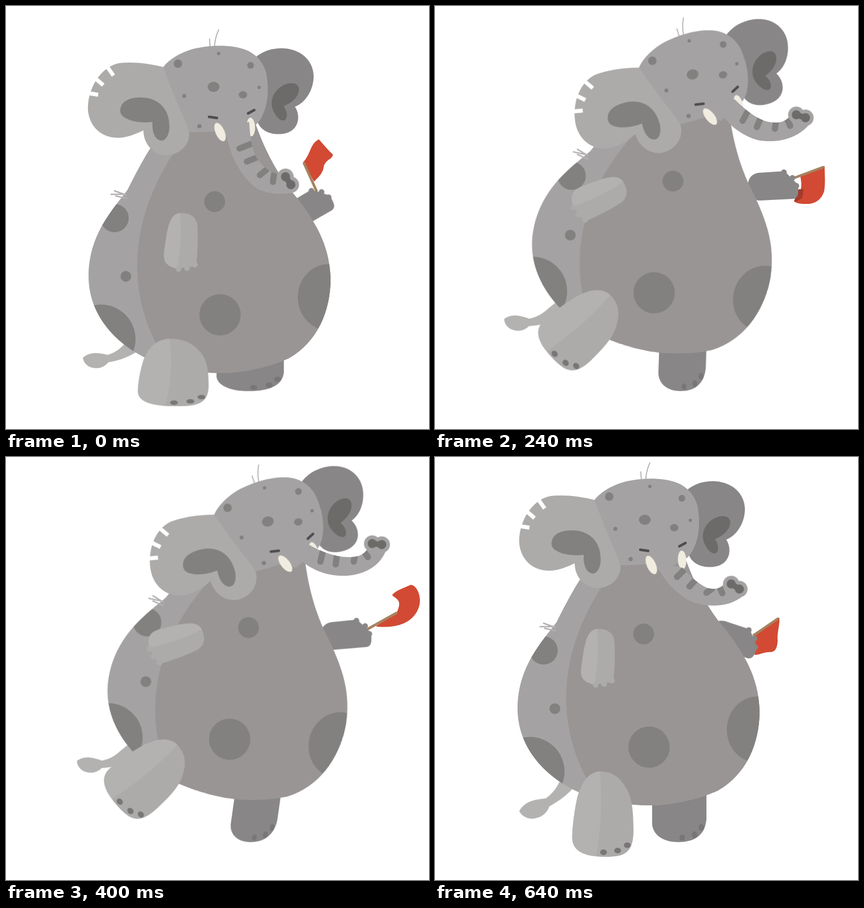
An HTML page without scripts for the animation above (0.72 s loop, 748x748 px).

```html
<!DOCTYPE html>
<html lang="en">
<head>
<meta charset="utf-8">
<title>Marching elephant</title>
<style>
html, body { margin: 0; width: 100%; height: 100%; overflow: hidden; background: #fff; }
svg { display: block; width: 100vw; height: 100vh; }

/* Six key poses a-f; the longer gaps get one in-between each. */
.move { animation: move .72s steps(2, end) infinite; }
.morph { animation: morph .72s steps(2, end) infinite; }
@keyframes move {
  0% { transform: var(--a); animation-timing-function: step-end; }
  11.111% { transform: var(--b); }
  33.333% { transform: var(--c); }
  55.555% { transform: var(--d); }
  77.777% { transform: var(--e); animation-timing-function: step-end; }
  88.888% { transform: var(--f); animation-timing-function: step-end; }
  100% { transform: var(--f); }
}
@keyframes morph {
  0% { d: var(--a); animation-timing-function: step-end; }
  11.111% { d: var(--b); }
  33.333% { d: var(--c); }
  55.555% { d: var(--d); }
  77.777% { d: var(--e); animation-timing-function: step-end; }
  88.888% { d: var(--f); animation-timing-function: step-end; }
  100% { d: var(--f); }
}

.skin { fill: #a4a2a3; }
.far { fill: #888687; }
.near { fill: #acabaa; }
.lit { fill: #b3b2b1; }
.spot { fill: #82817f; }
.toe { fill: #787676; }
.deep { fill: #6c6b69; }
.ivory { fill: #f0ece0; }
.line { fill: none; stroke-linecap: round; }

.body {
  transform-origin: 378px 546px;
  --a: translate(0, 0) rotate(0deg);
  --b: translate(-4px, -15px) rotate(5.2deg);
  --c: translate(9px, -39px) rotate(12.3deg);
  --d: translate(17px, -47px) rotate(12.3deg);
  --e: translate(4px, -6px) matrix(1.0176, -.0318, -.0283, .8864, 0, 0);
  --f: translate(0, -33px) rotate(0deg);
}
.head {
  transform-origin: 367px 143px;
  --a: translate(0, 0) rotate(0deg);
  --b: translate(26px, 1px) rotate(-7deg);
  --c: translate(88.5px, -22px) rotate(-14.3deg);
  --d: translate(96px, -29px) rotate(-14.3deg);
  --e: translate(22.5px, 17px) rotate(-14.3deg);
  --f: translate(4px, -32px) rotate(0deg);
}
.arm {
  transform-origin: 320px 464px;
  --a: translate(0, 0) rotate(0deg) scale(1);
  --b: translate(-28px, -13px) rotate(21deg) scale(1);
  --c: translate(-67px, -95px) rotate(61deg) scale(1);
  --d: translate(-60px, -111px) rotate(68deg) scale(1);
  --e: translate(-83px, -54px) rotate(59deg) scale(.97, .9);
  --f: translate(-21px, -62px) rotate(0deg) scale(1);
}
.leg {
  transform-origin: 323px 696px;
  --a: translate(3px, 3px) rotate(0deg) scale(1.156, .79);
  --b: translate(-6px, -25px) rotate(5deg) scale(1, 1);
  --c: translate(-92px, -65px) rotate(46deg) scale(1, 1);
  --d: translate(-103px, -70px) rotate(48deg) scale(1, 1);
  --e: translate(-70px, -22px) rotate(19deg) scale(1, 1);
  --f: translate(0, 0) rotate(0deg) scale(1, 1);
}
.farleg {
  transform-origin: 437px 681px;
  --a: translate(1px, 0) skewX(0deg) scale(1.24, .8);
  --b: translate(0, 0) skewX(0deg) scale(1, 1);
  --c: translate(3px, 0) skewX(-2deg) scale(.87, 1);
  --d: translate(1px, 0) skewX(-8deg) scale(.85, 1);
  --e: translate(-26px, 1px) skewX(-16deg) scale(1.13, .87);
  --f: translate(0, 0) skewX(0deg) scale(1, 1);
}
.farm {
  transform-origin: 632px 304px;
  --a: translate(-74px, 25px) rotate(-27deg) scale(1, 1);
  --b: translate(-50px, 19px) rotate(-15deg) scale(1, 1);
  --c: translate(0, 0) rotate(0deg) scale(1, 1);
  --d: translate(3px, -5px) rotate(-2deg) scale(1, 1);
  --e: translate(-42px, -20px) rotate(-20deg) scale(1.18, 1);
  --f: translate(-67px, 17px) rotate(22deg) scale(1, 1);
}
.tail {
  transform-origin: 181px 624px;
  --a: translate(0, 0) rotate(0deg) scale(1);
  --b: translate(-2px, -20px) rotate(0deg) scale(1);
  --c: translate(-14px, -64px) rotate(6deg) scale(1);
  --d: translate(-11px, -80px) rotate(6deg) scale(1);
  --e: translate(-13px, -51px) rotate(53deg) scale(1);
  --f: translate(19px, -13px) rotate(-19deg) scale(1.18);
}
.tip {
  --a: translate(499px, 309px) rotate(56deg);
  --b: translate(543px, 297px) rotate(50deg);
  --c: translate(647px, 195px) rotate(18deg);
  --d: translate(656px, 154px) rotate(6deg);
  --e: translate(588px, 154px) rotate(-8deg) scale(1.15, .9);
  --f: translate(531px, 229px) rotate(32deg);
}
.trunk {
  --a: path("M388 215C392 255 410 295 440 320C455 331 478 334 505 331L486 297C470 298 455 285 443 268C434 250 432 235 430 205Z");
  --b: path("M422 215C428 250 448 290 478 310C500 322 530 324 553 318L530 284C515 291 500 283 488 270C474 250 466 235 462 200Z");
  --c: path("M500 180C515 210 545 230 570 237C600 243 640 237 663 208L630 190C625 202 612 207 600 206C575 206 550 185 530 165Z");
  --d: path("M508 165C520 188 550 205 580 209C616 214 658 202 672 165L640 160C636 172 622 178 605 177C580 177 552 165 532 153Z");
  --e: path("M430 215C470 229 500 229 520 228C563 228 600 215 613 163L570 158C568 172 555 182 545 184C520 192 495 195 462 192Z");
  --f: path("M391 185C400 215 425 240 450 254C475 266 520 268 545 245L512 222C508 232 495 236 480 231C462 222 450 209 438 196Z");
}
.rings {
  --a: path("M433 244L413 252M441 269L426 275M460 290L449 299M474 297L472 311");
  --b: path("M470 242L453 250M484 266L468 272M503 286L494 292M518 287L518 302");
  --c: path("M552 188L544 203M576 198L569 214M603 205L601 217M622 198L628 212");
  --d: path("M560 168L556 185M585 174L583 190M617 174L615 185M632 166L640 177");
  --e: path("M481 193L478 212M513 192L511 208M547 182L548 197M564 171L576 180");
  --f: path("M441 199L428 212M460 218L450 229M490 233L480 240M503 229L508 241");
}
.flag {
  --a: path("M527 276C540 262 538 245 553 237C560 245 568 255 577 263C576 272 566 268 561 283C560 296 550 303 545 309Z");
  --b: path("M616 272C620 270 626 272 626 279C624 292 617 305 610 311C605 310 595 308 588 305C598 292 608 285 616 272Z");
  --c: path("M688 284C688 300 690 315 687 328C682 343 670 350 656 349C645 349 638 348 636 344C651 330 650 315 647 301Z");
  --d: path("M692 275C703 252 690 250 684 244C690 236 708 231 716 227C725 228 734 245 730 262C722 293 690 302 656 299Z");
  --e: path("M656 256C668 248 678 242 684 239C689 238 691 243 688 246C680 253 672 260 663 267C645 275 632 284 622 286Z");
  --f: path("M608 285C609 300 603 310 605 325C604 340 600 345 590 344C580 344 575 349 566 349C563 345 568 330 563 314Z");
}
.fold {
  --a: path("M545 309L545 309L545 309L545 309Z");
  --b: path("M569 259L617 274L587 305L554 293Z");
  --c: path("M641 326L650 325L648 339L637 345Z");
  --d: path("M656 299L656 299L656 299L656 299Z");
  --e: path("M630 280L630 280L630 280L630 280Z");
  --f: path("M566 345L566 345L566 345L566 345Z");
}
.pole {
  --a: path("M527 278L549 327");
  --b: path("M615 280L584 321");
  --c: path("M686 285L635 304");
  --d: path("M690 276L640 304");
  --e: path("M657 259L597 291");
  --f: path("M606 286L564 315");
}
</style>
</head>
<body>
<svg viewBox="0 0 748 748">
  <defs>
    <path id="torso" d="M300 190C262 235 240 275 215 325C203 341 185 362 170 388C152 420 146 450 146 478C146 560 215 612 265 630C300 643 345 650 390 649C440 646 480 632 500 623C550 595 574 540 574 482C572 420 545 380 515 340C485 305 460 262 441 208L430 180Z"/>
    <path id="paw" d="M310 366C292 366 288 385 284 405C281 425 278 440 280 448C282 458 295 464 304 464L336 460C339 440 340 400 338 385C335 372 325 366 310 366Z"/>
    <path id="foot" d="M293 556C270 556 256 580 250 610C245 635 242 665 243 678C246 700 270 707 303 707C335 707 351 700 351 660C351 616 346 598 337 584C326 565 312 556 293 556Z"/>
    <clipPath id="inTorso"><use href="#torso"/></clipPath>
    <clipPath id="inPaw"><use href="#paw"/></clipPath>
    <clipPath id="inFoot"><use href="#foot"/></clipPath>
    <clipPath id="inTrunk"><path class="trunk morph"/></clipPath>
  </defs>

  <g class="head move">
    <path class="far" d="M440 92C455 78 475 74 492 75C525 77 544 100 544 124C544 150 528 172 511 178C522 195 518 222 490 226C468 229 450 220 445 205Z"/>
    <path class="deep" d="M518 146C516 132 495 135 483 145C468 158 467 175 474 188C480 200 488 204 493 202C499 198 497 185 491 177C505 172 519 160 518 146Z"/>
  </g>

  <g stroke-linejoin="round">
    <path class="flag morph" fill="#d24a33" stroke="#d24a33" stroke-width="2"/>
    <path class="fold morph" fill="#a33b2c" stroke="#a33b2c" stroke-width="3"/>
    <path class="pole morph line" stroke="#a5835f" stroke-width="4.5"/>
  </g>

  <g class="farm move far">
    <path d="M572 295L618 292L642 316C643 330 643 339 634 341L574 344C560 343 552 330 553 318C554 304 560 297 572 295Z"/>
    <circle cx="617" cy="294" r="5"/><circle cx="632" cy="304" r="5"/><circle cx="639" cy="318" r="5"/>
  </g>

  <g class="farleg move">
    <path class="far" d="M384 560V648C384 665 400 681 430 681C460 681 478 668 480 640V560Z"/>
    <g class="toe">
      <ellipse cx="437" cy="673" rx="5" ry="5.5"/><ellipse cx="459" cy="668" rx="5" ry="6"/><ellipse cx="471" cy="655" rx="5" ry="6"/>
    </g>
  </g>

  <path class="tail move lit" d="M136 622C150 610 165 614 180 617C195 612 203 605 210 597L232 575L255 592C228 618 205 626 181 630C172 641 160 642 150 639C142 636 136 628 136 622Z"/>

  <g class="body move">
    <use href="#torso" class="skin"/>
    <g clip-path="url(#inTorso)">
      <path fill="#999594" d="M350 190C270 280 232 370 232 460C232 520 250 570 272 609L300 680H600V180Z"/>
      <g class="spot">
        <circle cx="369" cy="346" r="18.5"/><circle cx="378.5" cy="546" r="36.5"/>
        <circle cx="192" cy="375" r="25"/><circle cx="212" cy="478" r="9.5"/>
        <circle cx="168" cy="589" r="61"/><ellipse cx="570" cy="515" rx="54" ry="58.5"/>
      </g>
    </g>
    <path class="line" stroke="#b3b2b1" stroke-width="2.5" d="M192 327L212 334M186 333L210 333M194 336L213 340"/>
  </g>

  <g class="head move">
    <path class="line" stroke="#a4a2a3" stroke-width="1.5" d="M376 42Q367 62 369 82M360 58Q360 68 362 77"/>
    <path class="skin" d="M278 108C292 90 318 78 340 74C365 69 400 68 425 78C440 84 455 98 460 118C466 150 463 175 452 197C447 206 441 211 437 214L395 235L378 222L300 224L264 112Z"/>
    <g class="spot">
      <circle cx="304" cy="102" r="7.5"/><ellipse cx="367" cy="143" rx="10.5" ry="9"/>
      <ellipse cx="419" cy="157" rx="7.5" ry="6.5"/><circle cx="432.5" cy="105" r="6"/>
      <circle cx="447.5" cy="144" r="3"/><circle cx="315" cy="159" r="3.5"/>
      <circle cx="342" cy="212.5" r="3.8"/><circle cx="376" cy="84" r="3"/>
    </g>
    <path class="line" stroke="#4f4d4f" stroke-width="4.5" d="M359 196L373 198M428 190L439 184"/>
    <ellipse class="ivory" cx="433" cy="214" rx="7.5" ry="16.5" transform="rotate(-3 433 214)"/>
  </g>

  <path class="trunk morph skin"/>
  <g clip-path="url(#inTrunk)">
    <path class="rings morph line" stroke="#82817f" stroke-width="11"/>
  </g>
  <g class="tip move">
    <circle class="skin" cx="-8.5" r="14.5"/><circle class="skin" cx="8.5" r="14.5"/>
    <g class="deep">
      <circle cx="-8.5" r="8"/><circle cx="8.5" r="8"/><rect x="-8" y="-5" width="16" height="10"/>
    </g>
  </g>

  <g class="head move">
    <ellipse class="ivory" cx="378.5" cy="223" rx="8" ry="17.5" transform="rotate(-24 378.5 223)"/>
    <path class="near" d="M278 108C255 102 225 98 200 101C165 108 143 150 145 185C148 215 170 233 198 233C215 233 232 225 243 220C243 245 262 264 284 264C308 263 325 245 324 225C322 210 300 170 278 108Z"/>
    <path class="spot" d="M202 185C203 165 225 161 243 162C265 163 290 178 289 215C288 232 280 239 274 238C262 236 258 220 259 205C240 208 202 203 202 185Z"/>
    <path fill="none" stroke="#fff" stroke-width="7" d="M180 109L190 123M158 128L172 140M145 154L163 157"/>
  </g>

  <g class="leg move">
    <use href="#foot" class="near"/>
    <path class="lit" clip-path="url(#inFoot)" d="M291 550Q299 630 284 712H230V550Z"/>
    <g class="toe">
      <ellipse cx="298" cy="699" rx="6" ry="5"/><ellipse cx="323" cy="696" rx="6" ry="5"/><ellipse cx="340" cy="686.5" rx="6" ry="5"/>
    </g>
  </g>

  <g class="arm move near">
    <use href="#paw"/>
    <path class="lit" clip-path="url(#inPaw)" d="M307 360Q313 410 302 470H270V360Z"/>
    <circle cx="305" cy="465" r="5"/><circle cx="320" cy="463.5" r="5"/><circle cx="334" cy="457.5" r="5"/>
  </g>
</svg>
</body>
</html>
```
